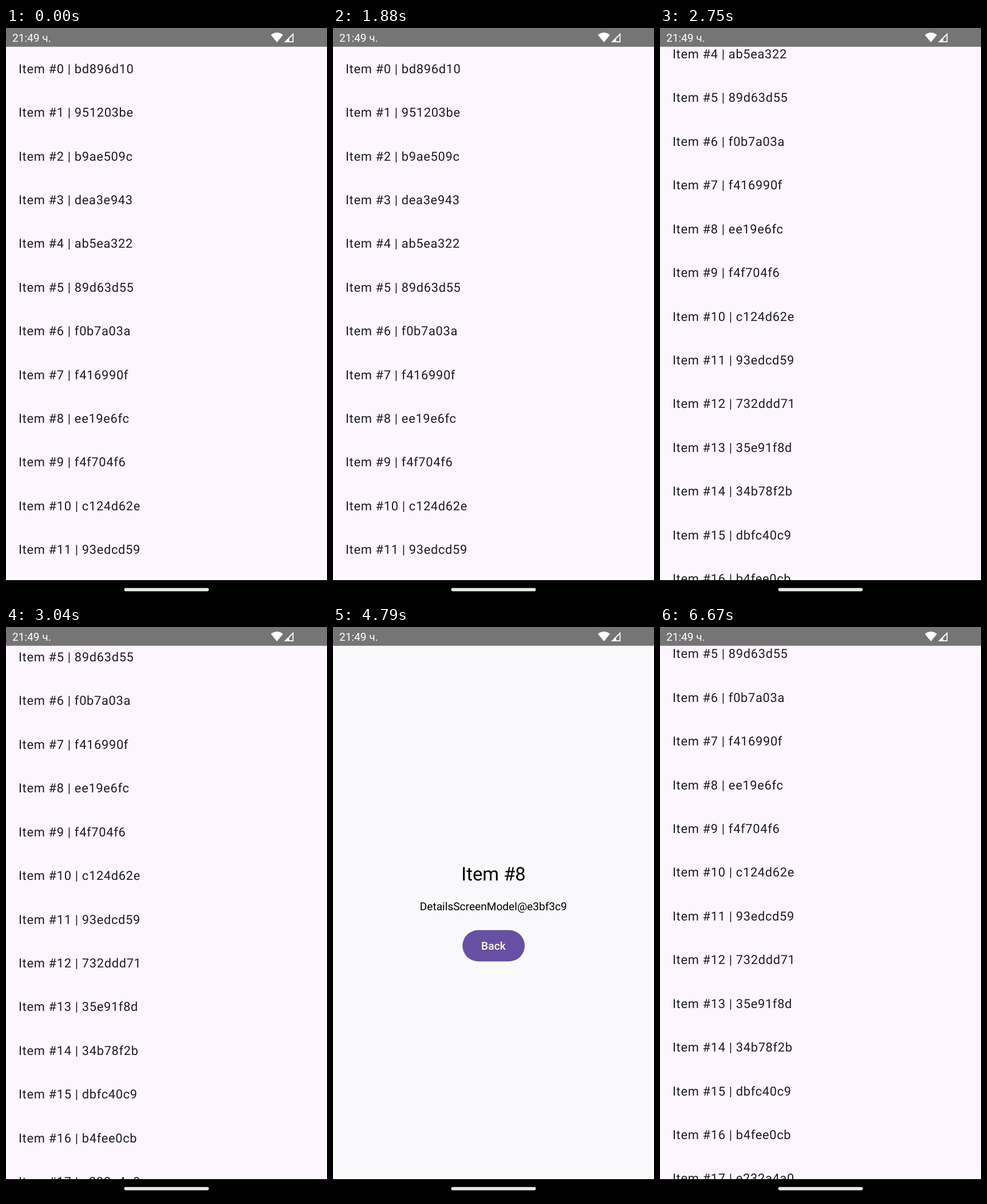
An HTML page for the animation above (6.71 s loop, 561 by 998 pixels).

```html
<!DOCTYPE html>
<html lang="en">
<head>
<meta charset="utf-8">
<title>List and details</title>
<style>
  html, body { margin: 0; width: 100%; height: 100%; overflow: hidden; background: #000; }
  svg { display: block; width: 561px; height: 998px; }
  text { font-family: Roboto, "Noto Sans", sans-serif; white-space: pre; text-rendering: geometricPrecision; }
  #rows text { font-size: 21.84px; letter-spacing: .68px; fill: #1d1b20; }
  #details text { text-anchor: middle; }
</style>
</head>
<body>
<svg viewBox="0 0 561 998">
  <rect id="page" width="561" height="998"/>
  <g id="rows"></g>
  <path id="spinner" fill="none" stroke="#6750a4" stroke-width="5.46" stroke-linecap="round"/>
  <g id="details">
    <text x="280.5" y="442.6" font-size="32.76">Item #8</text>
    <text x="280.3" y="495" font-size="19.11">DetailsScreenModel@e3bf3c9</text>
    <rect x="226.3" y="529.8" width="108.8" height="54.6" rx="27.3" fill="#6750a4"/>
    <text x="280.5" y="563.6" font-size="19.11" font-weight="500" letter-spacing=".14" fill="#fff">Back</text>
  </g>
  <rect width="561" height="32.8" fill="#757575"/>
  <g fill="#fff">
    <text x="11" y="24" font-size="19.11">21:49 ч.</text>
    <path d="M473.5 25 L463 12.2 Q473.5 3.8 484 12.2 Z"/>
    <path fill-rule="evenodd" d="M486 25 L502.5 8.5 V25 Z M495 18.8 V23.2 H500.7 V13.1 Z"/>
  </g>
  <rect y="965" width="561" height="33"/>
  <rect x="206.5" y="978.8" width="148" height="5.6" rx="2.8" fill="#e8e8e8"/>
</svg>
<script>
const LOOP = 6710, OPEN = 3366, LOADED = 4366, BACK = 5390;
const ROW = 76.42, FIRST_BASELINE = 78.7;
const ids = ("bd896d10 951203be b9ae509c dea3e943 ab5ea322 89d63d55 f0b7a03a f416990f ee19e6fc " +
  "f4f704f6 c124d62e 93edcd59 732ddd71 35e91f8d 34b78f2b dbfc40c9 b4fee0cb e232a4a0").split(" ");

// [time, offset] of the flick
const scrollSteps = [[2180, 0], [2260, 28], [2340, 82], [2420, 143], [2500, 200], [2580, 249],
  [2660, 292], [2750, 331], [2840, 362], [2930, 385], [3020, 399], [3110, 406.5]];

const $ = id => document.getElementById(id);
const page = $("page"), rows = $("rows"), spinner = $("spinner"), details = $("details");

ids.forEach((id, i) => {
  const text = document.createElementNS("http://www.w3.org/2000/svg", "text");
  text.setAttribute("x", 22);
  text.setAttribute("y", FIRST_BASELINE + i * ROW);
  text.textContent = `Item #${i} | ${id}`;
  rows.append(text);
});

const clamp = x => Math.min(1, Math.max(0, x));

function scrollAt(t) {
  if (t <= scrollSteps[0][0]) return 0;
  const next = scrollSteps.findIndex(step => step[0] > t);
  if (next < 0) return scrollSteps.at(-1)[1];
  const [t0, y0] = scrollSteps[next - 1], [t1, y1] = scrollSteps[next];
  return y0 + (y1 - y0) * (t - t0) / (t1 - t0);
}

// cubic-bezier(.4, 0, .2, 1), solved by bisection
function ease(x) {
  let lo = 0, hi = 1;
  for (let i = 0; i < 24; i++) {
    const u = (lo + hi) / 2, v = 1 - u;
    if (1.2 * v * v * u + .6 * v * u * u + u ** 3 < x) lo = u; else hi = u;
  }
  return lo * lo * (3 - 2 * lo);
}

function arc(t) {
  const turn = 1332, half = turn / 2, local = t % turn;
  const base = -90 + 216 * Math.floor(t / turn) + 286 * local / turn;
  const head = base + 290 * ease(clamp(local / half));
  const tail = base + 290 * ease(clamp((local - half) / half));
  const r = 24.6;
  const point = deg => {
    const a = deg * Math.PI / 180;
    return `${280.5 + r * Math.cos(a)} ${499 + r * Math.sin(a)}`;
  };
  return `M${point(tail)} A${r} ${r} 0 ${head - tail > 180 ? 1 : 0} 1 ${point(head)}`;
}

const show = (node, on) => node.setAttribute("visibility", on ? "visible" : "hidden");

function draw(t) {
  const inDetails = t >= OPEN && t < BACK;
  const loading = inDetails && t < LOADED;
  page.setAttribute("fill", inDetails ? "#f9f9fb" : "#fdf6fe");
  show(rows, !inDetails);
  show(spinner, loading);
  show(details, inDetails && !loading);
  rows.setAttribute("transform", `translate(0 ${-scrollAt(t)})`);
  if (loading) spinner.setAttribute("d", arc(t - OPEN));
}

const start = performance.now();
function tick() {
  draw((performance.now() - start) % LOOP);
  requestAnimationFrame(tick);
}
tick();
</script>
</body>
</html>
```
